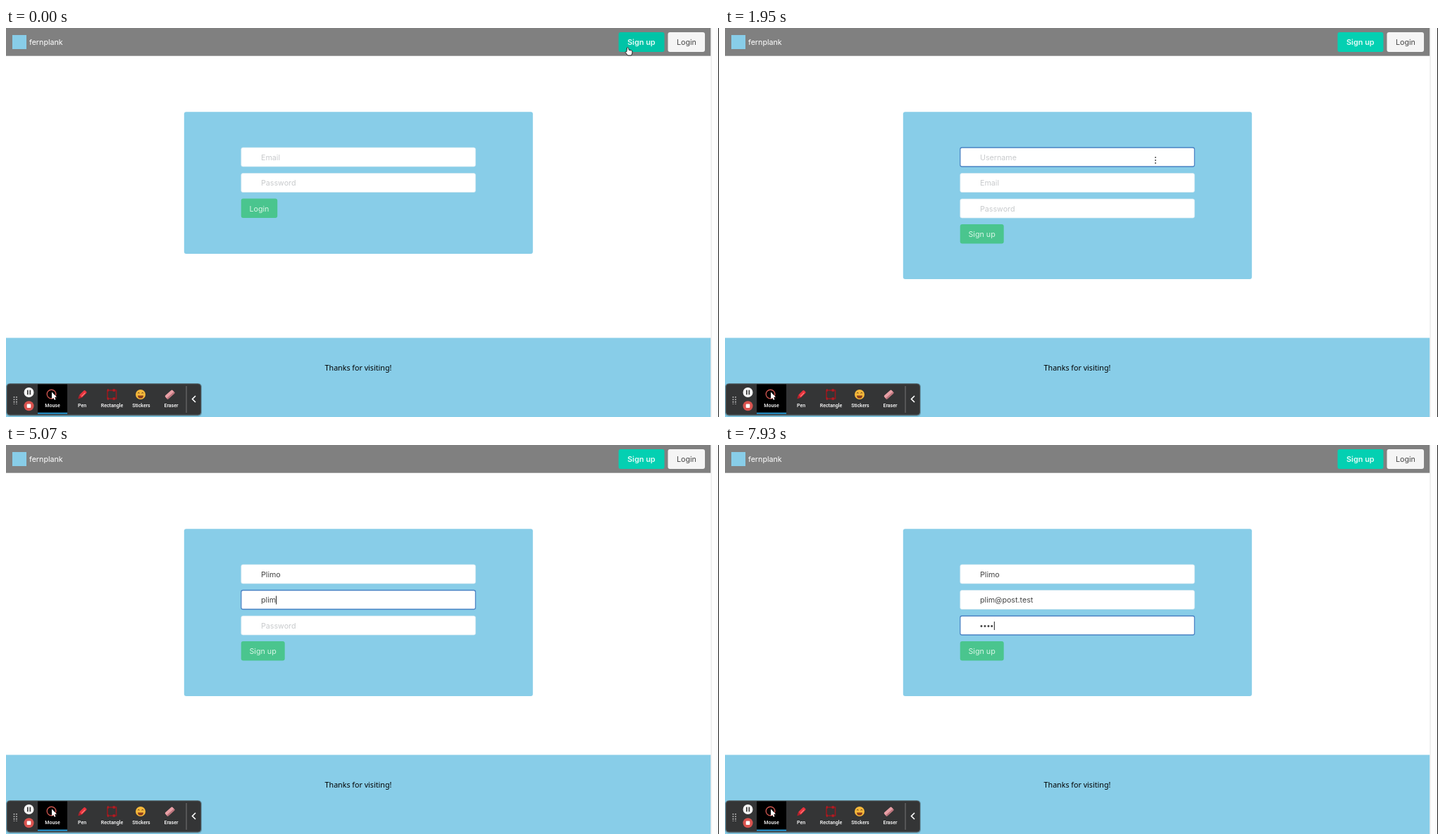
These frames come from a looping animation (1012 px wide and 553 px high, 8 s). An HTML page:

```html
<!DOCTYPE html>
<html lang="en">
<head>
<meta charset="utf-8">
<title>Sign up form</title>
<style>
  html, body { margin: 0; width: 100%; height: 100%; overflow: hidden; background: #fff; }
  svg { display: block; width: 100%; height: 100%; }
  text { font: 10.7px Inter, sans-serif; fill: #454545; white-space: pre; }
  .blue { fill: #88cde8; }
  .green { fill: #4ac58e; }
  .field rect { fill: #fff; stroke: #d5e8f1; stroke-width: .7; }
  .field.focus rect { stroke: #4a83c4; stroke-width: 1.3; }
  .field.empty text { fill: #c8cacc; }
  .field.secret:not(.empty) text { font: 11px "Liberation Sans", sans-serif; letter-spacing: 1.1px; }
  .caret { stroke: #222; stroke-width: 1; }
  .tools text { font: 500 7px Roboto, sans-serif; fill: #fff; text-anchor: middle; }
</style>
</head>
<body>
<svg viewBox="0 0 1012 553">
  <rect width="1012" height="553" fill="#fff"/>
  <rect width="1000.5" height="39.7" fill="#808080"/>
  <rect class="blue" x="9" y="10" width="20" height="20"/>
  <text x="33" y="24" style="fill:#fff">fernplank</text>
  <rect id="navSignup" x="869.5" y="6" width="65" height="28" rx="3"/>
  <text x="882" y="24" style="font-size:10.9px;font-weight:600;fill:#e4fbf7">Sign up</text>
  <rect x="939.5" y="6" width="52.5" height="28" rx="3" fill="#f5f5f5"/>
  <text x="952" y="24">Login</text>

  <rect id="panel" class="blue" x="252.8" y="119.3" width="495" rx="3"/>
  <g id="fields"></g>
  <g id="submit">
    <rect class="green" x="333.7" y="0" height="27.5" rx="3"/>
    <text x="345.5" y="18" style="fill:#d9f5e6"></text>
  </g>

  <rect class="blue" y="440.5" width="1000.5" height="113"/>
  <text x="500" y="487" text-anchor="middle" style="font:10.7px 'Noto Sans',sans-serif;fill:#000">Thanks for visiting!</text>
  <rect x="1000.5" width="11" height="553" fill="#fdfdfd"/>
  <path d="M1001 0V553" stroke="#e3e3e3"/>
  <path d="M1011.5 0V553" stroke="#1c1c1c"/>

  <g class="tools">
    <rect x="0" y="505" width="278" height="47" rx="5" fill="#000" opacity=".22"/>
    <rect x="1.5" y="506" width="275" height="44" rx="4" fill="#343536" stroke="#4b4c4d"/>
    <path d="M11.5 524V535M15 524V535" stroke="#ccc" stroke-width="1.6" stroke-dasharray="1.6 1.8"/>
    <circle cx="32.5" cy="518" r="7" fill="#f4f4f4"/>
    <path d="M30.8 514.8V521.2M34.3 514.8V521.2" stroke="#333" stroke-width="1.6"/>
    <circle cx="32.5" cy="537.3" r="7" fill="#d9534f"/>
    <rect x="29.7" y="534.5" width="5.6" height="5.6" rx="1" fill="#fff"/>
    <rect x="45" y="506.5" width="42" height="42" fill="#000"/>
    <rect x="45" y="546.7" width="42" height="2" fill="#279bd8"/>
    <circle cx="64.5" cy="520.5" r="6.3" fill="none" stroke="#c9534c" stroke-width="1.4"/>
    <path d="M65 517.5v10l2.3-2 1.5 3.3 1.7-.8-1.5-3.2h3z" fill="#fff"/>
    <g transform="translate(108 521.5) rotate(45)">
      <rect x="-2.6" y="-7.5" width="5.2" height="11" rx="1.5" fill="#e8323c"/>
      <path d="M-2.6 3.5h5.2L0 8z" fill="#b3202b"/>
      <path d="M1 -5V2" stroke="#ff8a8a"/>
    </g>
    <rect x="144" y="515" width="12.5" height="12" fill="none" stroke="#97191f" stroke-width="1.6"/>
    <path d="M144 515h12.5M144 527h12.5" stroke="#b51c24" stroke-width="3.4" stroke-dasharray="3.2 6" stroke-dashoffset="1.6"/>
    <circle cx="191" cy="521" r="7" fill="#f5b83a"/>
    <path d="M187 522.5a4 4 0 0 0 8 0z" fill="#8a3c1d"/>
    <path d="M187 519.3q1.3-2 2.6 0M192.4 519.3q1.3-2 2.6 0" stroke="#59351a" fill="none"/>
    <g transform="translate(232.5 521) rotate(-42)">
      <rect x="-7" y="-3.2" width="14" height="6.4" rx="1.5" fill="#e9a0a6"/>
      <rect x="-7" y="1" width="14" height="2.4" rx="1" fill="#b9737b"/>
    </g>
    <path d="M256 509V547" stroke="#777"/>
    <path d="M269 523l-4.5 4.5 4.5 4.5" fill="none" stroke="#fff" stroke-width="1.6"/>
    <text x="66" y="539.3">Mouse</text>
    <text x="108" y="539.3">Pen</text>
    <text x="150.5" y="539.3">Rectangle</text>
    <text x="192" y="539.3">Stickers</text>
    <text x="234.5" y="539.3">Eraser</text>
  </g>

  <circle id="ring" cx="889.5" cy="22" fill="none" stroke="#d4505e" stroke-width="2"/>
  <g id="pointer" stroke-linejoin="round">
    <path id="hand" d="M-2.5-5q1.3-1 2 .4l.8 3q3.6-.5 4.6 1.5V3L3.5 6h-5L-5 1.5q0-1.5 1.8-.6z" fill="#fff" stroke="#222" stroke-width="1"/>
    <path id="arrow" d="M-3-6V5l2.5-2.2L1.3 7 3 6.2 1.2 2.2h3.5z" fill="#111" stroke="#fff" stroke-width=".8"/>
    <path id="beam" d="M0-5V5" stroke="#777" stroke-width="2" stroke-dasharray="2 2"/>
  </g>
</svg>
<script>
const LOOP = 8000, STEP = 130;
const SIGNUP_AT = 650, FOCUS_AT = 1820;
const $ = id => document.getElementById(id);

// Focus spans and typing clocks, all in milliseconds.
const inputs = {
  Username: { value: "Plimo", from: FOCUS_AT, to: 4000, start: 2600, pace: 180 },
  Email: { value: "plim@post.test", from: 4100, to: 7000, start: 4550, pace: 150 },
  Password: { value: "••••", from: 7000, to: LOOP, start: 7280, pace: 200 }
};

for (const [name, input] of Object.entries(inputs)) {
  $("fields").insertAdjacentHTML("beforeend",
    `<g><rect x="333.8" y="170" width="332.6" height="27" rx="2.5"/>
     <text x="362" y="187.8">${name}</text><path class="caret" d="M0 178V190"/></g>`);
  input.group = $("fields").lastElementChild;
}

const clamp = value => Math.max(0, Math.min(1, value));
const progress = (t, from, to) => clamp((t - from) / (to - from));
const ease = p => p * p * (3 - 2 * p);
const mix = (a, b, p) => a + (b - a) * p;
const show = (node, visible) => node.setAttribute("display", visible ? "inline" : "none");

function drawInput(name, row, t) {
  const { value, from, to, start, pace, group } = inputs[name];
  const count = Math.max(0, Math.min(value.length, Math.floor((t - start) / pace) + 1));
  const focused = t >= from && t < to;
  const idle = t - (count ? start + count * pace : from);
  const [, text, caret] = group.children;
  group.setAttribute("transform", `translate(0 ${row * 36.5})`);
  group.setAttribute("class", ["field", focused && "focus", !count && "empty",
    name === "Password" && "secret"].filter(Boolean).join(" "));
  text.textContent = count ? value.slice(0, count) : name;
  const end = 362.5 + (count ? text.getComputedTextLength() : 0);
  caret.setAttribute("transform", `translate(${end} 0)`);
  // The caret stays solid while typing and blinks otherwise.
  show(caret, focused && t > FOCUS_AT + 260 && (idle < 0 || idle % 1000 >= 500 || idle < 100));
}

function drawForm(t) {
  const signup = t >= SIGNUP_AT;
  const rows = signup ? ["Username", "Email", "Password"] : ["Email", "Password"];
  show(inputs.Username.group, signup);
  rows.forEach((name, row) => drawInput(name, row, t));
  $("panel").setAttribute("height", signup ? 237.7 : 201.7);
  const [box, label] = $("submit").children;
  box.setAttribute("width", signup ? 62 : 51.5);
  label.textContent = signup ? "Sign up" : "Login";
  $("submit").setAttribute("transform", `translate(0 ${169.8 + rows.length * 36.4})`);
}

function drawPointer(t) {
  const hover = ease(progress(t, 0, 520));
  const travel = ease(progress(t, 1040, 1750));
  const x = mix(mix(884, 890, hover), 611, travel);
  const y = mix(mix(33, 26, hover), 188, travel);
  const onButton = x > 869 && y < 35;
  const onInput = x > 334 && x < 666 && y > 170;
  $("pointer").setAttribute("transform", `translate(${x} ${y})`);
  show($("pointer"), t < 2600);
  show($("hand"), onButton);
  show($("beam"), onInput);
  show($("arrow"), !onButton && !onInput);
  $("navSignup").setAttribute("fill", onButton ? "#00c4a7" : "#04d0b2");

  const click = progress(t, 650, 780);
  show($("ring"), t >= 650 && t < 1040);
  $("ring").setAttribute("r", mix(14, 22, click));
  $("ring").setAttribute("opacity", 1 - progress(t, 780, 1040));
}

function frame(now) {
  const t = Math.floor((now % LOOP) / STEP) * STEP;
  drawForm(t);
  drawPointer(t);
  requestAnimationFrame(frame);
}
frame(0);
</script>
</body>
</html>
```
